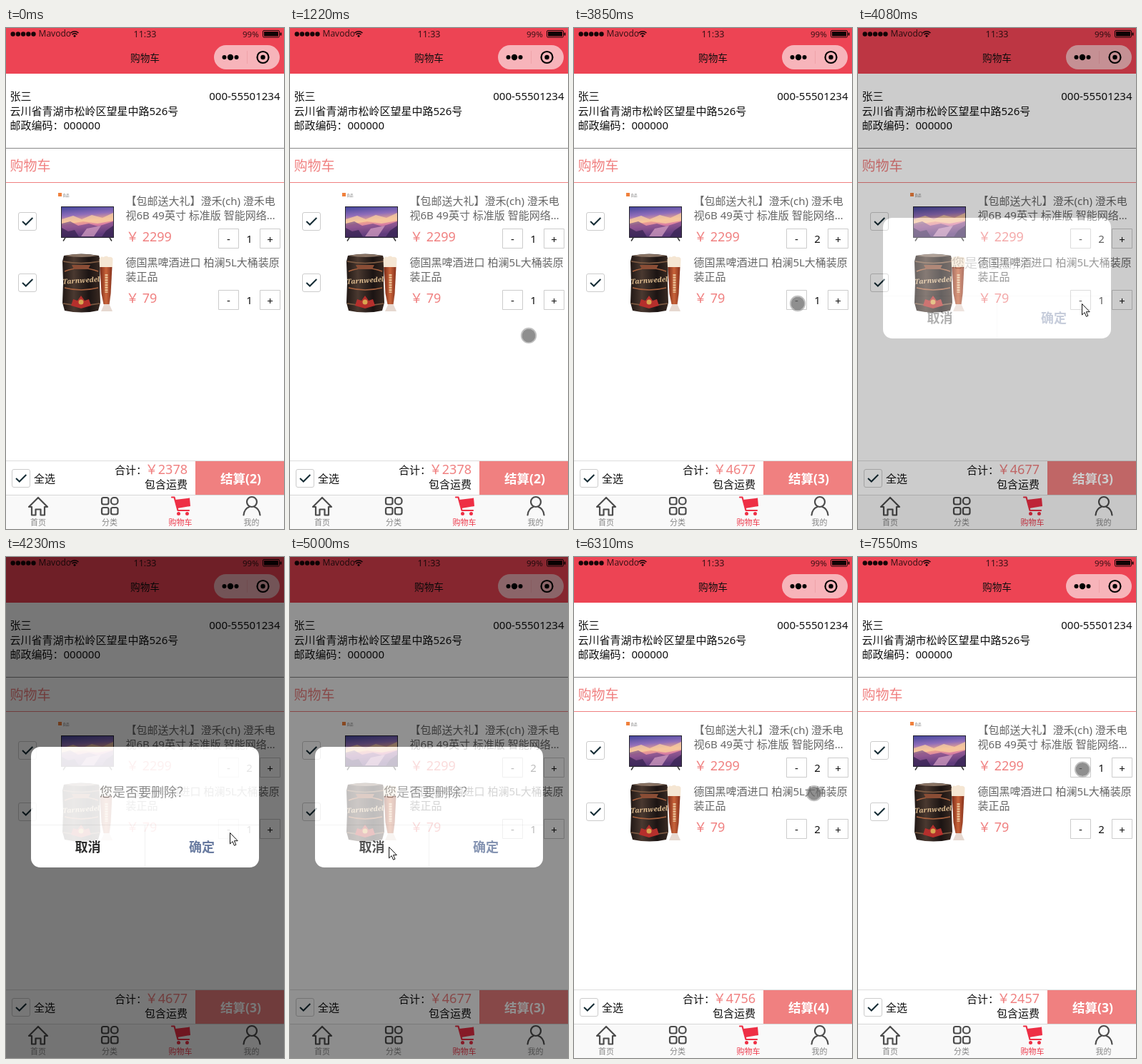
An HTML page that plays this animation: 389x702 px, repeating every 8000 ms.

```html
<!DOCTYPE html>
<html lang="zh-CN">
<head>
<meta charset="utf-8">
<title>购物车</title>
<style>
  html, body { margin: 0; width: 100%; height: 100%; overflow: hidden; background: #fff; }
  svg { display: block; width: 389px; height: 702px; }
  text { font: 15px "Noto Sans", "Noto Sans CJK SC", sans-serif; fill: #111; white-space: pre; }
  .end { text-anchor: end; }
  .mid { text-anchor: middle; }
  .status text { font-size: 12px; fill: #3a1216; }
  .name { fill: #666; }
  .price { font-size: 18px; fill: #f08080; }
  .pay { font-size: 17.5px; font-weight: 700; fill: #fff; }
  .tabs text { font-size: 11px; fill: #888; text-anchor: middle; }
  .tabs text.on { fill: #ee3a4c; }
  .icon { fill: none; stroke: #4c4c4c; stroke-width: 2.2; stroke-linejoin: round; stroke-linecap: round; }
  .ask { font-size: 18px; fill: #888; }
  .act { font-size: 18px; font-weight: 700; text-anchor: middle; }
</style>
</head>
<body>
<svg viewBox="0 0 389 702">
  <defs>
    <linearGradient id="sky" x1="0" y1="0" x2=".15" y2="1">
      <stop offset="0" stop-color="#43469c"/>
      <stop offset=".3" stop-color="#8f6dba"/>
      <stop offset=".52" stop-color="#f0a98c"/>
      <stop offset=".68" stop-color="#d97fa4"/>
      <stop offset="1" stop-color="#4a2f66"/>
    </linearGradient>
    <linearGradient id="keg">
      <stop offset="0" stop-color="#211815"/>
      <stop offset=".3" stop-color="#4a3930"/>
      <stop offset=".7" stop-color="#1b1413"/>
      <stop offset="1" stop-color="#3a2a22"/>
    </linearGradient>
    <linearGradient id="beer">
      <stop offset="0" stop-color="#7c2a17"/>
      <stop offset=".5" stop-color="#c9643a"/>
      <stop offset="1" stop-color="#86301b"/>
    </linearGradient>
    <g id="check">
      <rect x=".5" y=".5" width="25" height="25" rx="2.5" fill="#fff" stroke="#ccc"/>
      <path d="M6 13L10.800 17.500 20.300 8" fill="none" stroke="#152c35" stroke-width="2"/>
    </g>
    <g id="stepper">
      <path d="M297.500 .5h28v27h-28zM355.500 .5h28v27h-28z" fill="#fff" stroke="#ccc"/>
      <text class="mid" x="311.500" y="20">-</text>
      <text class="mid" x="369.500" y="20.500">+</text>
    </g>
  </defs>

  <rect width="389" height="702" fill="#fff"/>
  <rect width="389" height="64" fill="#ed4454"/>
  <text class="mid" x="194.500" y="47" style="font-size:13.700px">购物车</text>

  <text x="5.500" y="101">张三</text>
  <text class="end" x="383.500" y="101">000-55501234</text>
  <text x="5.500" y="122">云川省青湖市松岭区望星中路526号</text>
  <text x="5.500" y="142">邮政编码：000000</text>
  <path d="M0 168.500H389" stroke="#888"/>
  <text x="5.500" y="200" style="font-size:19px;fill:#f08080">购物车</text>
  <path d="M0 216.500H389" stroke="#f08080"/>

  <!-- television -->
  <use href="#check" x="17" y="258"/>
  <rect x="73" y="231" width="5" height="5" fill="#f0803c"/>
  <text x="79.500" y="235.500" style="font-size:4.500px;fill:#777">良品</text>
  <rect x="77" y="250" width="74" height="44" fill="#26232f"/>
  <rect x="78" y="251" width="72" height="41.500" fill="url(#sky)"/>
  <path d="M78 268l16-5 12 5 14-6 15 4 15-7v11l-22 4-20-3-30 5z" fill="#fbd0a0" opacity=".75"/>
  <path d="M78 274l12-3 11 6 15-3 13 4 21-7v21.500H78z" fill="#6b4388" opacity=".65"/>
  <path d="M105 292l8-11 20-4-10 15z" fill="#d9a3c4" opacity=".7"/>
  <path d="M78 280l9 5 9-2 6 9.500H78zM150 277l-10 7-6 8.500h16z" fill="#33214f" opacity=".7"/>
  <path d="M83 294l-3 4.500M145 294l3 4.500" stroke="#333" stroke-width="1.500"/>
  <text class="name" x="167.500" y="248">【包邮送大礼】澄禾(ch) 澄禾电</text>
  <text class="name" x="167.500" y="268">视6B 49英寸 标准版 智能网络…</text>
  <text class="price" x="168" y="299">￥ 2299</text>
  <use href="#stepper" y="281"/>
  <text class="mid" id="qty1" x="340.500" y="301">1</text>

  <!-- beer -->
  <use href="#check" x="17" y="344"/>
  <path d="M81 319q24-5 49 0l2 8-1 30 1 28-3 11q-23 5-47 0l-3-11 1-28-1-30z" fill="url(#keg)"/>
  <path d="M82 319q23-4 47 0-23 4-47 0z" fill="#8b7565"/>
  <path d="M80 327q25 5 51 0M80 386q25 5 51 0" fill="none" stroke="#7d5a42" stroke-width="1.500"/>
  <path d="M82 341q23-9 47 0M82 364q23 6 47 0" fill="none" stroke="#a8623f" stroke-width="1.500"/>
  <path d="M92 332h26l-3 6H95z" fill="#8a4d35"/>
  <text class="mid" transform="translate(105.500 357) rotate(-4)" style="font:italic 700 9.500px 'Noto Serif',serif;fill:#e3c193">Tarnwedel</text>
  <path d="M91 389l3-9 6 2 5-7 5 7 6-2 3 9-14 4z" fill="#b52f2c"/>
  <circle cx="105" cy="384" r="3.500" fill="#d9a650"/>
  <path d="M131 322h18l-2 50-2 16 4 9h-16l4-9-3-16z" fill="#e6d8d0"/>
  <path d="M131.500 334h17l-2 38-2 15h-8l-3-15z" fill="url(#beer)"/>
  <path d="M130.500 324q2-5 6-3 4-3 7 0 5-1 6 3l-.5 11H131z" fill="#f5e6d3"/>
  <path d="M140.500 345v26" stroke="#e8be92" stroke-width="4" stroke-dasharray="2.500 1"/>
  <text class="name" x="167.500" y="333.500">德国黑啤酒进口 柏澜5L大桶装原</text>
  <text class="name" x="167.500" y="354">装正品</text>
  <text class="price" x="168" y="385">￥ 79</text>
  <use href="#stepper" y="367"/>
  <text class="mid" id="qty2" x="340.500" y="387">1</text>

  <!-- checkout bar -->
  <path d="M0 606.500H389" stroke="#ddd"/>
  <use href="#check" x="8" y="618"/>
  <text x="39" y="637">全选</text>
  <text x="152" y="625">合计：</text>
  <text class="price end" id="total" x="254" y="625">￥2378</text>
  <text class="end" x="254" y="645">包含运费</text>
  <rect x="265" y="607" width="124" height="47" fill="#f08080"/>
  <text class="pay mid" id="pay" x="328.500" y="638">结算(2)</text>

  <g class="tabs">
    <rect y="654" width="389" height="48" fill="#f9f9f9"/>
    <path d="M0 654.500H389" stroke="#d8d8d8"/>
    <path class="icon" d="M32 671L45 658 58 671H54V682.500H48.500V674.500H41.500V682.500H36V671Z"/>
    <g class="icon">
      <rect x="134" y="658" width="9.500" height="9.500" rx="2.500"/>
      <rect x="147" y="658" width="9.500" height="9.500" rx="4"/>
      <rect x="134" y="672" width="9.500" height="9.500" rx="2.500"/>
      <rect x="147" y="672" width="9.500" height="9.500" rx="2.500"/>
    </g>
    <path d="M237 661L257 658.500 258 670 240 673Z" fill="#ee2f45"/>
    <path d="M232 657.500h3.500l5 18.500h15.500" class="icon" style="stroke:#ee2f45"/>
    <circle cx="241.500" cy="680.500" r="2.500" fill="#ee2f45"/>
    <circle cx="253.500" cy="680.500" r="2.500" fill="#ee2f45"/>
    <circle class="icon" cx="344" cy="664" r="7"/>
    <path class="icon" d="M332.500 682.500q1-9 8-11.500M355.500 682.500q-1-9-8-11.500"/>
    <text x="45" y="697">首页</text>
    <text x="145" y="697">分类</text>
    <text class="on" x="244" y="697">购物车</text>
    <text x="343.500" y="697">我的</text>
  </g>

  <!-- status bar and capsule -->
  <g class="status">
    <path d="M9.700 8.500H40" stroke="#180608" stroke-width="6.400" stroke-linecap="round" stroke-dasharray="0 7.200"/>
    <text x="45.500" y="12">Mavodo</text>
    <path d="M90.500 7q5.500-4.500 11 0M92.500 9.200q3.500-3 7 0" fill="none" stroke="#180608" stroke-width="1.600"/>
    <circle cx="96" cy="11.300" r="1.500" fill="#180608"/>
    <text class="mid" x="194.500" y="12.500" style="font-size:12.500px">11:33</text>
    <text x="331" y="12.500" style="font-size:11.500px">99%</text>
    <rect x="359.500" y="3.500" width="23" height="9.500" rx="1.500" fill="none" stroke="#180608"/>
    <path d="M361 5h20v6.500h-20zM383.500 6.500h2v4h-2z" fill="#100405"/>
  </g>
  <rect x="291" y="24" width="92" height="34" rx="17" fill="#fff" opacity=".6"/>
  <path d="M337.500 32V50" stroke="#e9939c" opacity=".5"/>
  <circle cx="305.500" cy="41" r="3"/>
  <circle cx="314" cy="41" r="4.200"/>
  <circle cx="322.500" cy="41" r="3"/>
  <circle cx="359.500" cy="41" r="8" fill="none" stroke="#000" stroke-width="2.200"/>
  <circle cx="359.500" cy="41" r="3.200"/>

  <g id="modal" opacity="0">
    <rect width="389" height="702" opacity=".6"/>
    <rect x="35" y="266" width="319" height="169" rx="13" fill="#fff"/>
    <path d="M35 375.500H354M194.500 376V435" stroke="#f0f0f0"/>
    <text class="ask" x="131" y="336">您是否要删除？</text>
    <text class="act" x="114.500" y="413">取消</text>
    <text class="act" x="274" y="413" style="fill:#576b95">确定</text>
  </g>

  <g id="cursor">
    <g id="touch">
      <circle r="9.500" fill="#696969" fill-opacity=".75"/>
      <circle r="10.300" fill="none" stroke="#969696" stroke-opacity=".6" stroke-width="1.700"/>
    </g>
    <path id="arrow" d="M.5 .5V16L4 12.600 6.500 18.300 8.900 17.200 6.400 11.700H11.200Z" fill="#fff" stroke="#111"/>
  </g>
</svg>
<script>
  const LOOP = 8000, TICK = 76.9;
  const $ = id => document.getElementById(id);
  const clamp = v => Math.min(1, Math.max(0, v));

  // pointer path: time, x, y
  const path = [
    [0, 350, 730], [380, 350, 730], [460, 344, 692], [690, 313, 461], [1000, 313, 461],
    [1230, 334, 431], [1530, 354, 372], [1840, 369, 307], [1920, 377, 300], [2130, 377, 300],
    [2750, 312.5, 297.5], [3240, 312.5, 297.5], [3690, 313, 386], [4470, 313, 386],
    [4840, 118, 407], [4960, 118, 407], [5380, 337.5, 395.5], [5600, 371, 382],
    [5770, 371, 382], [5840, 366, 385], [5930, 366, 385], [6530, 318, 299],
    [7400, 318, 299], [7540, 314, 297.5], [LOOP, 314, 297.5]
  ];

  function pointer(t) {
    const i = Math.max(1, path.findIndex(p => p[0] >= t));
    const [t0, x0, y0] = path[i - 1], [t1, x1, y1] = path[i];
    const k = (t - t0) / (t1 - t0);
    return [x0 + (x1 - x0) * k, y0 + (y1 - y0) * k];
  }

  function setText(id, value) {
    const el = $(id);
    if (el.textContent !== value) el.textContent = value;
  }

  function draw(now) {
    const t = Math.floor((now % LOOP + 12) / TICK) * TICK;
    const tvs = t >= 2065 && t < 6680 ? 2 : 1;
    const kegs = t >= 5760 ? 2 : 1;
    setText("qty1", `${tvs}`);
    setText("qty2", `${kegs}`);
    setText("total", `￥${tvs * 2299 + kegs * 79}`);
    setText("pay", `结算(${tvs + kegs})`);

    const alpha = clamp((t - 3985) / 275) * (1 - clamp((t - 4920) / 280));
    $("modal").setAttribute("opacity", alpha);
    $("touch").setAttribute("visibility", alpha ? "hidden" : "visible");
    $("arrow").setAttribute("visibility", alpha ? "visible" : "hidden");
    $("cursor").setAttribute("transform", `translate(${pointer(t)})`);
  }

  const start = performance.now();
  function loop() {
    draw(performance.now() - start);
    requestAnimationFrame(loop);
  }
  loop();
</script>
</body>
</html>
```
